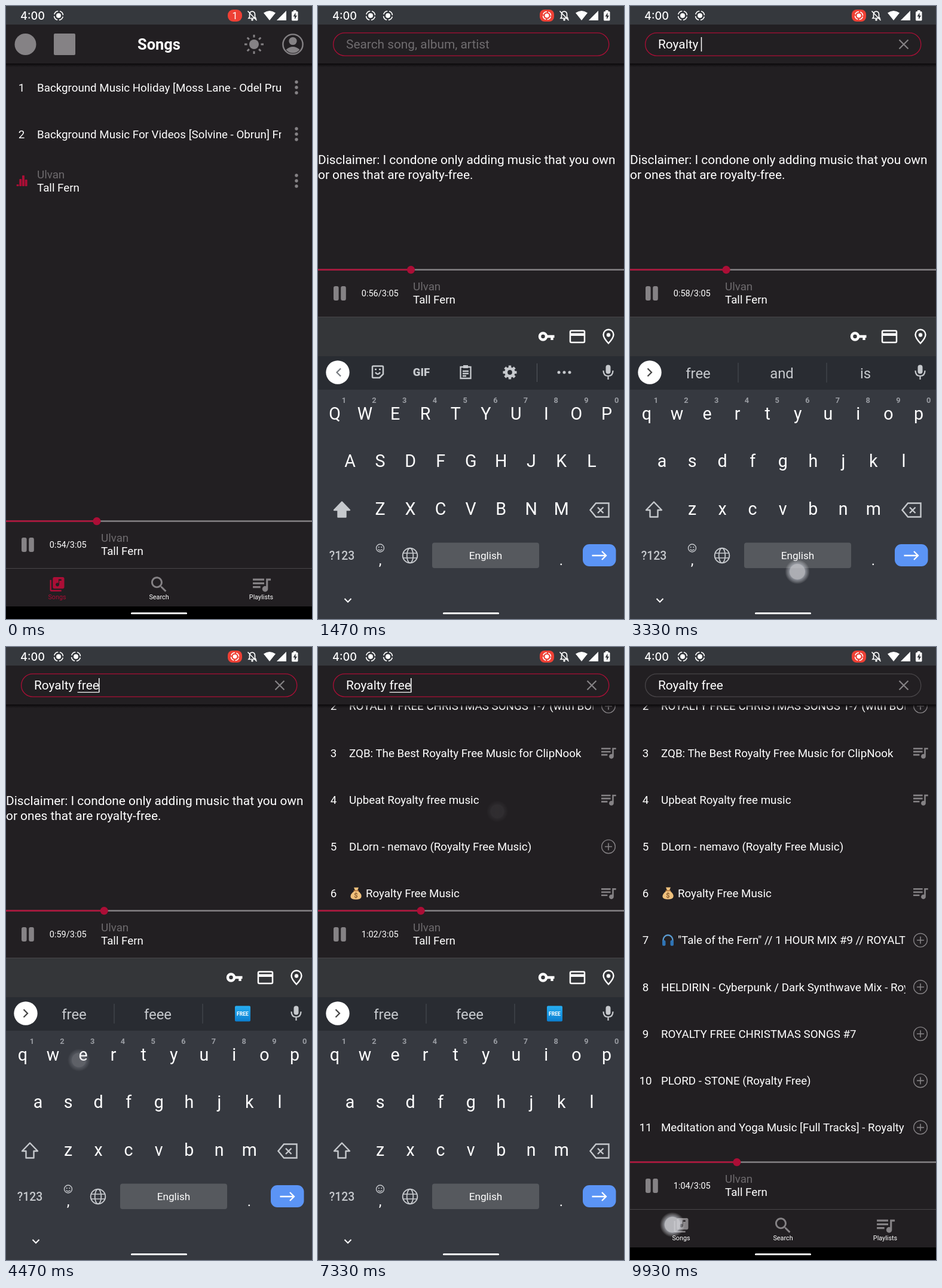
Write an HTML page that moves like this. It is 512x1024 px and loops after 9990 ms.

```html
<!DOCTYPE html>
<html lang="en">
<head>
<meta charset="utf-8">
<title>Music player</title>
<style>
  html, body { margin: 0; width: 100%; height: 100%; overflow: hidden; background: #221f22; }
  svg { display: block; width: 100vw; height: 100vh; }
  text { font-family: Roboto, sans-serif; white-space: pre; }
</style>
</head>
<body>
<svg id="stage" viewBox="0 0 512 1024" xmlns="http://www.w3.org/2000/svg"></svg>
<script>
const LOOP = 9990, BG = '#221f22', RED = '#ab0e36', GREY = '#858285', KEY = '#c6c9cd';
const SEARCH_AT = 820, OPEN_AT = 880, STRIP_AT = 1250, SPIN_AT = 4870, RESULTS_AT = 6330,
      CLOSE_AT = 8400, LEAVE_AT = 9870, ROW = 78.2, SCROLL = 115.4;

// Drawing helpers
const txt = (x, y, size, s, more = '') => `<text x="${x}" y="${y}" font-size="${size}" fill="#fff" ${more}>${s}</text>`;
const mid = (x, y, size, s, more = '') => txt(x, y, size, s, 'text-anchor="middle" ' + more);
const rect = (x, y, w, h, fill, more = '') => `<rect x="${x}" y="${y}" width="${w}" height="${h}" fill="${fill}" ${more}/>`;
const dot = (x, y, r, fill, more = '') => `<circle cx="${x}" cy="${y}" r="${r}" fill="${fill}" ${more}/>`;
const ring = (x, y, r, color, w, more = '') => dot(x, y, r, 'none', `stroke="${color}" stroke-width="${w}" ${more}`);
const line = (d, color, w, more = '') => `<path d="${d}" fill="none" stroke="${color}" stroke-width="${w}" ${more}/>`;
const shape = (d, x, y, k, more = '') => `<path d="${d}" transform="translate(${x} ${y}) scale(${k})" ${more}/>`;
const group = (id, body, more = '') => `<g id="${id}" ${more}>${body}</g>`;
const range = (n, fn) => Array.from({ length: n }, (_, i) => fn(i)).join('');

const SEARCH = 'M15.5 14h-.79l-.28-.27C15.41 12.59 16 11.11 16 9.5 16 5.91 13.09 3 9.5 3S3 5.91 3 9.5 5.91 16 9.5 16c1.61 0 3.09-.59 4.23-1.57l.27.28v.79l5 4.99L20.49 19l-4.99-5zm-6 0C7.01 14 5 11.99 5 9.5S7.01 5 9.5 5 14 7.01 14 9.5 11.99 14 9.5 14z';
const LIBRARY = 'M20 2H8c-1.1 0-2 .9-2 2v12c0 1.1.9 2 2 2h12c1.1 0 2-.9 2-2V4c0-1.1-.9-2-2-2zm-2 5h-3v5.5c0 1.38-1.12 2.5-2.5 2.5S10 13.88 10 12.5s1.12-2.5 2.5-2.5c.57 0 1.08.19 1.5.51V5h4v2zM4 6H2v14c0 1.1.9 2 2 2h14v-2H4V6z';
const QUEUE = 'M15 6H3v2h12V6zm0 4H3v2h12v-2zM3 16h8v-2H3v2zM17 6v8.18c-.31-.11-.65-.18-1-.18-1.66 0-3 1.34-3 3s1.34 3 3 3 3-1.34 3-3V8h3V6h-5z';

const ARTIST = 'Ulvan', TITLE = 'Tall Fern', SIZE = 18.76;
const results = [
  '+Royalty Free Music for Videos',
  '+ROYALTY FREE CHRISTMAS SONGS 1-7 (with BONUS)',
  '=ZQB: The Best Royalty Free Music for ClipNook',
  '=Upbeat Royalty free music',
  '+DLorn - nemavo (Royalty Free Music)',
  '=Royalty Free Music',
  '+"Tale of the Fern" // 1 HOUR MIX #9 // ROYALTY FREE',
  '+HELDIRIN - Cyberpunk / Dark Synthwave Mix - Royalty Free',
  '+ROYALTY FREE CHRISTMAS SONGS #7',
  '+PLORD - STONE (Royalty Free)',
  '+Meditation and Yoga Music [Full Tracks] - Royalty Free'
];

// Typed text: time, field content, suggestions
const typed = [
  [1560, 'R', 'R|Re|Right'], [1870, 'Ro', 'Ro|Room|Rock'], [2180, 'Roy', 'Roy|Royal|Roya'],
  [2300, 'Roya', 'Roya|Royalty|Royal'], [2460, 'Royal', 'Royal|Royalty|Royals'],
  [2720, 'Royalt', 'Royalt|Royalty|Royal'], [3000, 'Royalty', 'Royalty|Royal|Loyalty'],
  [3330, 'Royalty ', 'free|and|is'], [3600, 'Royalty f', 'f|free|for'],
  [3830, 'Royalty fr', 'fr|free|from'], [4060, 'Royalty fre', 'fre|free|fee'], [4270, 'Royalty free', 'free|feee|']
];

// Touches: press time, x, y, hold, vertical travel
const touches = [
  [600, 226, 964, 220], [1480, 176, 692, 60], [1790, 430, 690, 60], [2120, 272, 680, 100], [2160, 63, 769, 100],
  [2350, 443, 770, 100], [2640, 236, 690, 60], [2920, 280, 690, 60], [3240, 280, 945, 60], [3520, 208, 772, 60],
  [3750, 186, 690, 60], [3980, 114, 690, 60], [4190, 122, 690, 60], [4640, 470, 918, 120],
  [6560, 300, 390, 480, -SCROLL], [8230, 473, 336, 120], [LEAVE_AT, 71, 965, 200]
];
const FADE = 320;
const beats = [0, .65, 1.3, 2.25, 3.3, 4.45, 5.75, 6.5, 7.3, 8.15, 9.05, 9.73];

const recorder = (x, r = 7.5) =>
  ring(x, 16, r, '#fff', 1.6, `stroke-dasharray="${r * 1.2} ${r * .37}" transform="rotate(14 ${x} 16)"`) + dot(x, 16, r * .53, '#fff');
const kebab = y => [-9, 0, 9].map(d => dot(486, y + d, 2.7, GREY)).join('');
const plus = y => ring(486, y, 11.3, GREY, 1.4) + line(`M480 ${y}h12M486 ${y - 6}v12`, GREY, 1.6);
const clipText = (y, s, x = 52) => `<g clip-path="url(#titles)">${txt(x, y + 6.6, SIZE, s)}</g>`;

function statusBar() {
  return rect(0, 0, 512, 31, '#35383d') +
    txt(24, 22.5, 18.2, '4:00', 'style="font-family:Inter,sans-serif" font-weight="500"') + recorder(88) +
    group('badge', rect(371, 6, 24, 20, '#ee4035', 'rx="9"') + mid(383, 22, 16, '1')) +
    group('recording', recorder(117) + rect(371, 6, 24, 20, '#ee4035', 'rx="8"') + recorder(383, 6.5)) +
    line('M406 20.500h12l-1.500-2v-4.500q0-4.500-4.500-5q-4.500.500-4.500 5v4.500zM404.500 8.500l15 15.500', '#fff', 1.7) +
    dot(412, 23, 1.8, '#fff') +
    '<path d="M431 11.500q10-7 20 0l-10 12.500z" fill="#fff"/>' +
    '<path d="M453 24l16-16v16z" fill="#fff" opacity=".45"/><path d="M453 24l11-11v11zM453 24l16-16h0v16z" fill="#fff"/>' +
    rect(478, 9, 10.5, 15.500, '#fff', 'rx="1.500"') + rect(481, 7, 4.500, 3, '#fff') +
    '<path d="M484.500 11l-4 6.500h2.500v5l4-6.500h-2.500z" fill="#35383d"/>';
}

function songsPage() {
  const row = (y, n, s) => mid(26, y + 6.6, SIZE, n) + clipText(y, s);
  return row(136, 1, 'Background Music Holiday [Moss Lane - Odel Prunik]') +
    row(214, 2, 'Background Music For Videos [Solvine - Obrun] Free') +
    txt(52, 287.5, SIZE, ARTIST, 'style="fill:#6d6a6d"') + txt(52, 309.5, SIZE, TITLE) +
    [136, 214, 292].map(kebab).join('') +
    range(4, i => rect(17.6 + 4.7 * i, 290, 3.9, 11, RED, `id="bar${i}" rx=".8"`));
}

function songsHeader() {
  const sun = range(8, i => line('M415 52.500v-4.500', GREY, 3, `transform="rotate(${i * 45} 415 64)"`));
  return dot(32.500, 64, 18, GREY) + rect(80, 46, 36, 36, GREY, 'rx="2"') +
    mid(256, 73, 25.4, 'Songs', 'font-weight="700"') + dot(415, 64, 8, GREY) + sun +
    ring(480, 64, 16.6, GREY, 2.4) + dot(480, 58.500, 6.6, GREY) +
    `<path d="M468.500 73q11.500-10 23 0q-4.500 5.500-11.500 5.500t-11.500-5.500z" fill="${GREY}"/>`;
}

function resultRow(s, i) {
  const y = 136 + ROW * i, n = i + 1;
  const emoji = n == 6
    ? `<path d="M60 ${y - 10}h8l-2 5q8 6 6.500 11q-1 4-9 4t-9-4q-1-5 7.500-11z" fill="#efc07c"/>` +
      line(`M59.500 ${y - 4.500}h8.500`, '#b5763a', 1.6) + mid(63.500, y + 7, 11, '$', 'style="fill:#8a5a2c" font-weight="700"')
    : n == 7
    ? line(`M55.500 ${y + 3}v-3a8 8.500 0 0 1 16 0v3`, '#5b9bd0', 2.4) +
      rect(54, y, 5.500, 9.500, '#2f74b5', 'rx="2.500"') + rect(67.500, y, 5.500, 9.500, '#2f74b5', 'rx="2.500"')
    : '';
  const icon = s[0] == '+' ? plus(y) : shape(QUEUE, 470.1, y - 16.4, 1.3, `fill="${GREY}"`);
  return mid(26, y + 6.6, SIZE, n) + emoji + clipText(y, s.slice(1), emoji ? 80 : 52) + group('icon' + n, icon);
}

function searchHeader() {
  return rect(25.6, 44.8, 461.200, 38.400, 'none', 'id="field" rx="19.200" stroke-width="1.300"') +
    txt(47, 71, 20.85, 'Search song, album, artist', 'id="hint" style="fill:#6f6c6f"') +
    txt(47, 71, 20.85, '', 'id="query"') + rect(47, 75, 0, 1.200, '#fff', 'id="under"') +
    rect(46, 52, 1.500, 24, '#fff', 'id="caret"') +
    group('clear', line('M450.500 56.500l15 15M465.500 56.500l-15 15', GREY, 2.200));
}

function player() {
  const tab = (id, x, label, icon) => group(id, icon + mid(x, 991.3, 10.8, label));
  return rect(0, 860, 512, 143, BG) + rect(0, 859.300, 512, 2.500, GREY) + rect(0, 859.300, 152, 2.500, RED, 'id="done"') +
    dot(152, 860.600, 6.600, RED, 'id="knob"') +
    rect(26, 888, 8.600, 24, GREY, 'rx="3"') + rect(38.200, 888, 8.600, 24, GREY, 'rx="3"') +
    txt(72.800, 905, 14.5, '', 'id="clock"') +
    txt(159, 895, SIZE, ARTIST, 'style="fill:#6d6a6d"') + txt(159, 917.3, SIZE, TITLE) +
    rect(0, 939, 512, 1, '#484548') +
    tab('tabSongs', 85.500, 'Songs', shape(LIBRARY, 71.1, 951.600, 1.2)) +
    tab('tabSearch', 256, 'Search', shape(SEARCH, 238.600, 949, 1.457)) +
    tab('tabLists', 427, 'Playlists', shape(QUEUE, 408.300, 947, 1.58, `fill="${GREY}"`)) +
    rect(171, 940, 171, 63, '#33b5e5', 'id="flash" opacity=".4"');
}

function keyboard() {
  const letters = (rows) => rows.map((r, i) => [...r].map((c, j) =>
    mid([28, 53.500, 104][i] + 50.55 * j, 691 + 79.3 * i, 28.6, c)).join('')).join('');
  const lower = ['qwertyuiop', 'asdfghjkl', 'zxcvbnm'];
  const gear = range(8, i => rect(318.800, 600.500, 4.400, 5, KEY, `transform="rotate(${45 * i} 321 612)"`));
  const tools = line('M38 605.500l-6.500 6.500l6.500 6.500', '#777b80', 2.200) +
    line('M91 603q0-1.500 1.500-1.500h15q1.500 0 1.500 1.500v12l-6 6h-10.500q-1.500 0-1.500-1.500zM96 612q4 6 8 0M95 607h3M102 607h3', KEY, 2.500) +
    mid(173, 618, 18.500, 'GIF', `style="fill:${KEY}" font-weight="900"`) +
    line('M238.500 603h17v19h-17zM242 610h10M242 614h10M242 618h6', KEY, 2.300) + rect(243, 600, 8, 5, KEY) +
    ring(321, 612, 6.300, KEY, 4.800) + gear + rect(366, 597, 1, 31, '#555960') +
    [403, 412, 421].map(x => dot(x, 612, 2.500, KEY)).join('');
  const words = line('M29.500 605.500l6.500 6.500l-6.500 6.500', '#444', 2.200) +
    rect(180.500, 596, 1, 33, '#4a4e54') + rect(328.500, 596, 1, 33, '#4a4e54') +
    [114, 254, 394].map((x, i) => mid(x, 621.500, 23.900, '', `id="word${i}" style="fill:${KEY}"`)).join('') +
    group('free', rect(383, 599.500, 26, 26, 'url(#sky)', 'rx="2"') + mid(396, 615.800, 8.600, 'FREE', 'font-weight="700"'));
  const strip = rect(0, 520, 512, 66, '#343639') +
    ring(376.500, 552, 5.500, '#fff', 4.500) + line('M383 552h12.500M391.500 552v6', '#fff', 4.300) +
    rect(422, 542.500, 24, 19.500, 'none', 'rx="2" stroke="#fff" stroke-width="2.500"') + rect(422, 546.500, 24, 4.500, '#fff') +
    line('M486 563.500q-8.500-9-8.500-14.500a8.500 8.500 0 0 1 17 0q0 5.500-8.500 14.500z', '#fff', 2.400) + dot(486, 549.500, 3.200, '#fff');
  const bottom = mid(40, 924.500, 19.400, '?123', `style="fill:${KEY}" font-weight="500"`) +
    ring(104, 905.500, 6.500, KEY, 1.400) + dot(101.700, 904, 1, KEY) + dot(106.300, 904, 1, KEY) + line('M100.500 907.500q3.500 3.500 7 0', KEY, 1.300) +
    mid(104, 934, 24, ',') + mid(407, 934, 24, '.') +
    ring(154, 918, 12.300, KEY, 1.900) + line('M142 914h24M142 922h24', KEY, 1.700) +
    `<ellipse cx="154" cy="918" rx="5.300" ry="12.300" fill="none" stroke="${KEY}" stroke-width="1.800"/>` +
    rect(191, 896.500, 179, 42.500, '#56595e', 'rx="4"') + mid(280.500, 924, 17.200, 'English') +
    rect(443, 899, 55.500, 37, '#5b94f5', 'rx="11"') + line('M458.500 918h23M475 911l7 7l-7 7', '#fff', 2.300) +
    line('M44.500 990l5.500 5.500l5.500-5.500', '#fff', 2);
  return group('strip', strip) + rect(0, 585, 512, 56, '#292c32') + rect(0, 641, 512, 860, '#363940') +
    dot(33, 612, 19.700, '#fff') + group('tools', tools) + group('words', words) +
    rect(481.500, 599.500, 8, 15, KEY, 'rx="4"') + line('M477.500 609q0 9 8 9t8-9M485.500 618v6', KEY, 2.200) +
    range(10, i => mid(43.300 + 50.7 * i, 663, 12.800, (i + 1) % 10, 'style="fill:#9a9da3" font-weight="700"')) +
    group('lower', letters(lower)) + group('upper', letters(lower.map(r => r.toUpperCase()))) +
    line('M40 828.500l13 13.500h-6.500v11.500h-13v-11.500h-6.500z', KEY, 2.400, 'id="shift" stroke-linejoin="round"') +
    line('M465 830.500h21.500v23h-21.500l-9.500-11.500zM468 837.500l9.500 9.500M477.500 837.500l-9.500 9.500', KEY, 2.400) + bottom;
}

document.getElementById('stage').innerHTML = `<defs>
  <clipPath id="titles"><rect x="50" y="0" width="410.500" height="1024"/></clipPath>
  <linearGradient id="shade" x2="0" y2="1"><stop stop-color="#0b090b"/><stop offset="1" stop-color="#0b090b" stop-opacity="0"/></linearGradient>
  <linearGradient id="sky" x2="0" y2="1"><stop stop-color="#27aef2"/><stop offset="1" stop-color="#0b7fd0"/></linearGradient>
  <radialGradient id="tip"><stop stop-color="#d0d1d6" stop-opacity=".85"/><stop offset=".6" stop-color="#cfd0d5" stop-opacity=".85"/>
    <stop offset=".66" stop-color="#e0e4ee" stop-opacity=".5"/><stop offset="1" stop-color="#fff" stop-opacity="0"/></radialGradient>
</defs>` +
  rect(0, 0, 512, 1024, BG) + group('songs', songsPage()) +
  group('note', txt(0, 263.500, 20.85, 'Disclaimer: I condone only adding music that you own') +
    txt(0, 288.500, 20.85, 'or ones that are royalty-free.')) +
  ring(256, 266, 23.900, RED, 4.300, 'id="spinner"') +
  group('list', results.map(resultRow).join('')) +
  rect(0, 31, 512, 66, BG) + rect(0, 96, 512, 6, 'url(#shade)') +
  group('songsHead', songsHeader()) + group('searchHead', searchHeader()) + statusBar() +
  group('player', player()) + rect(0, 583.500, 512, 420, '#fff', 'id="blank"') + rect(0, 1003, 512, 21, '#000') +
  group('keys', keyboard()) + rect(209, 1013, 94, 3, '#fff', 'rx="1.500"') +
  touches.map((_, i) => dot(0, 0, 21, 'url(#tip)', `id="touch${i}"`)).join('');

const el = {};
document.querySelectorAll('[id]').forEach(e => el[e.id] = e);
const set = (id, attrs) => { for (const k in attrs) el[id].setAttribute(k, attrs[k]); };
const show = (id, on) => { el[id].style.display = on ? '' : 'none'; };
const write = (id, s) => { if (el[id].textContent !== s) el[id].textContent = s; };
const clamp = v => Math.max(0, Math.min(1, v));
const smooth = v => v * v * (3 - 2 * v);
const between = (t, a, b) => t >= a && t < b;

function drawPlayer(t, raised) {
  const s = beats.filter(b => b * 1000 <= t).pop();
  const x = 151.9 + s * 512 / 185, sec = Math.floor(54.97 + s);
  set('done', { width: x });
  set('knob', { cx: x });
  write('clock', `${Math.floor(sec / 60)}:${String(sec % 60).padStart(2, '0')}/3:05`);
  set('player', { transform: `translate(0 ${raised ? -420 : 0})` });
  const paint = (id, on) => {
    el[id].firstChild.setAttribute('fill', on ? RED : GREY);
    el[id].lastChild.setAttribute('fill', on ? RED : '#fff');
  };
  paint('tabSongs', t < SEARCH_AT);
  paint('tabSearch', between(t, SEARCH_AT, LEAVE_AT));
  show('flash', between(t, 660, 990));
}

function drawSearch(t, entry, raised) {
  const text = entry ? entry[1] : '', focused = t < CLOSE_AT;
  write('query', text);
  show('hint', !text);
  show('clear', text);
  set('field', { stroke: focused ? RED : '#484548' });
  const end = text ? el.query.getComputedTextLength() : 0;
  const start = text.indexOf(' ') < 0 ? 0 : el.query.getSubStringLength(0, text.indexOf(' ') + 1);
  set('under', { x: 47 + start, width: Math.max(0, end - start) });
  show('under', focused);
  set('caret', { x: 46.2 + end });
  show('caret', focused && (t - (entry ? entry[0] : OPEN_AT)) % 1000 < 500);

  show('note', between(t, SEARCH_AT, SPIN_AT));
  set('note', { transform: `translate(0 ${raised ? 0 : 210})` });
  show('spinner', between(t, SPIN_AT, RESULTS_AT));
  const p = ((t - SPIN_AT + 1400) % 1400) / 1400, unit = 1.185;
  const grow = smooth(clamp(p * 2)), shrink = smooth(clamp(p * 2 - 1));
  set('spinner', {
    'stroke-dasharray': `${(5 + 95 * grow) * unit} ${200 * unit}`,
    'stroke-dashoffset': -(15 * grow + 110 * shrink) * unit,
    transform: `rotate(${p * 360 - 97} 256 266)`
  });
  show('list', t >= RESULTS_AT);
  const q = 1 - clamp((t - 6600) / 800);
  set('list', { transform: `translate(0 ${-SCROLL * (1 - q * q * q)})` });
  show('icon5', t < 8540);
}

function drawKeys(t, entry, raised) {
  const up = clamp((t - OPEN_AT) / 190), down = clamp((t - CLOSE_AT) / 220);
  const drop = 450 * ((1 - up) ** 2 + down ** 2);
  show('keys', t >= OPEN_AT && down < 1);
  set('keys', { transform: `translate(0 ${drop})`, opacity: clamp(up * 1.4) * (1 - down) });
  show('blank', raised);
  show('strip', t >= STRIP_AT);
  show('upper', !entry);
  show('lower', entry);
  set('shift', { fill: entry ? 'none' : KEY });
  show('tools', !entry);
  show('words', entry);
  const words = entry ? entry[2].split('|') : ['', '', ''];
  words.forEach((w, i) => write('word' + i, w));
  show('free', entry && !words[2]);
}

function drawTouches(t) {
  touches.forEach(([at, x, y, hold, travel = 0], i) => {
    const age = t - at, fade = clamp((age - hold) / FADE);
    show('touch' + i, age >= 0 && fade < 1);
    const go = 1 - (1 - clamp(age / hold)) ** 2;
    set('touch' + i, { cx: x, cy: y + travel * go, r: 21 - 3 * fade, opacity: 1 - fade });
  });
}

function draw(t) {
  const onSongs = t < SEARCH_AT, raised = between(t, OPEN_AT, CLOSE_AT);
  const entry = typed.filter(e => e[0] <= t).pop();
  show('songs', onSongs);
  show('songsHead', onSongs);
  show('searchHead', !onSongs);
  show('badge', t < 200);
  show('recording', t >= 200);
  [-1.57, .1, 1.06, 0].forEach((phase, i) => {
    const h = 11 + 8 * Math.sin(phase + t * (.009 + .002 * i));
    set('bar' + i, { y: 301 - h, height: h });
  });
  drawPlayer(t, raised);
  drawSearch(t, entry, raised);
  drawKeys(t, entry, raised);
  drawTouches(t);
}

const began = performance.now();
function tick() {
  draw((performance.now() - began) % LOOP);
  requestAnimationFrame(tick);
}
draw(0);
requestAnimationFrame(tick);
</script>
</body>
</html>
```
